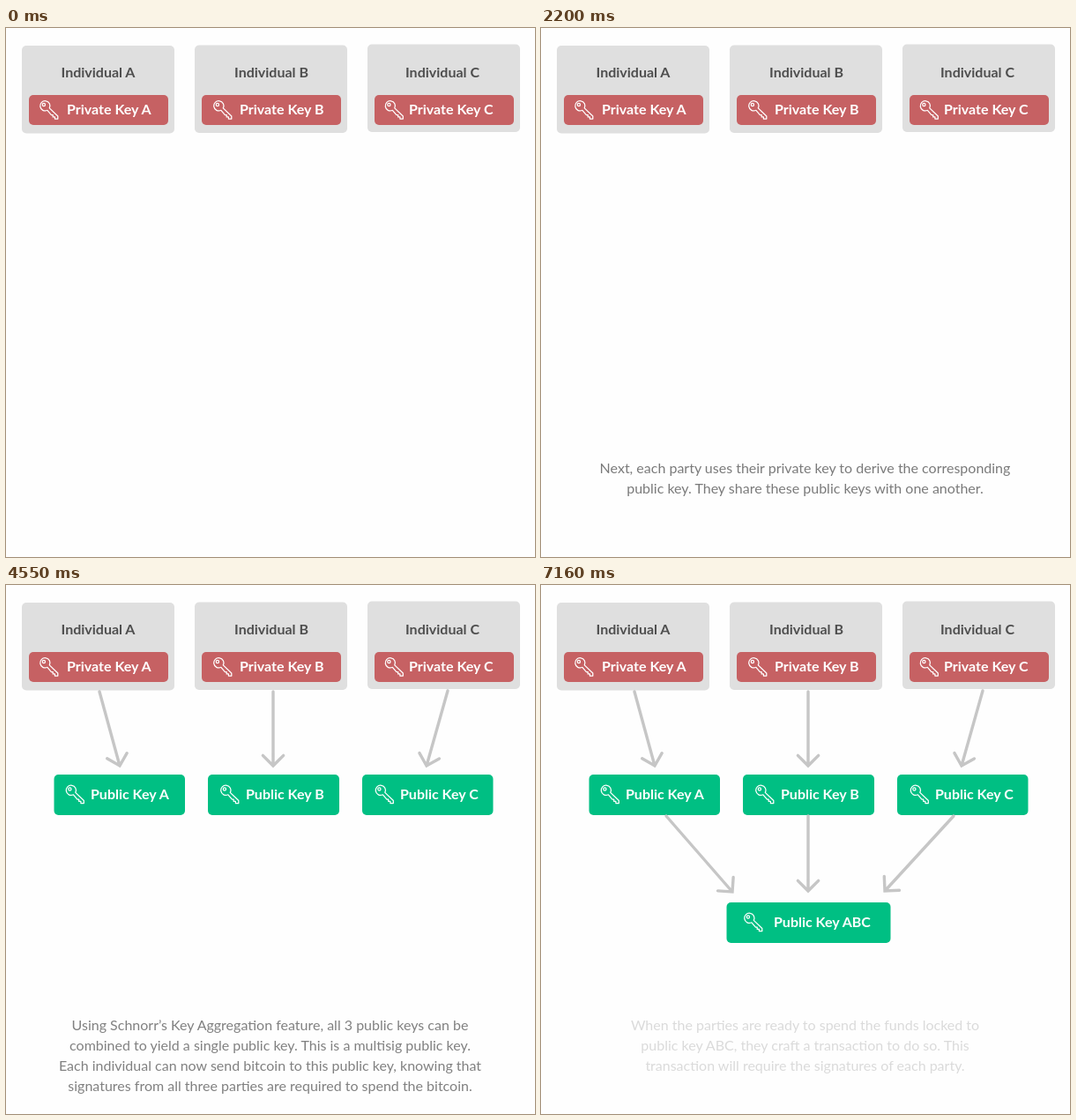
Write an HTML page that moves like this. It is 600 px wide and 600 px high and loops after 7.18 s.

```html
<!DOCTYPE html>
<html lang="en">
<head>
<meta charset="utf-8">
<title>Schnorr Multisig setup</title>
<style>
  html, body { margin: 0; height: 100%; overflow: hidden; background: #fefefe; }
  svg { display: block; width: 100%; height: 100%; }
  text { font: 16px Lato, "Open Sans", sans-serif; }
  .label { font-weight: 700; fill: #fff; }
  .title { font-weight: 700; fill: #4e4e4e; text-anchor: middle; }
  .caption { fill: #545454; text-anchor: middle; }
  .arrow { fill: none; stroke: #c6c6c6; stroke-width: 3.4; stroke-linecap: round; }
  .icon { fill: none; stroke: #fff; stroke-width: 1.25; stroke-linejoin: round; }
</style>
</head>
<body>
<svg id="stage" viewBox="0 0 600 600"></svg>
<script>
const LOOP = 7180;
const GREY = '#dfdfdf', RED = '#c66163', GREEN = '#00bf83';

const box = (x, y, w, h, fill) =>
  `<rect x="${x}" y="${y}" width="${w}" height="${h}" rx="5" fill="${fill}"/>`;

const text = (cls, x, y, str) => `<text class="${cls}" x="${x}" y="${y}">${str}</text>`;

const icon = (x, y) => `<g class="icon" transform="translate(${x} ${y})">
  <path d="M8.9 11.3A5.6 5.6 0 1 1 11.3 8.9L20.8 18V21H17.4V18.9H15.2V16.7H13.4Z"/>
  <circle cx="4.9" cy="4.9" r="1.6"/></g>`;

// Straight arrow whose two head strokes open 45 degrees from the shaft
function arrow(x1, y1, x2, y2) {
  const back = Math.atan2(y1 - y2, x1 - x2);
  const tip = turn => `${x2 + 16.5 * Math.cos(back + turn)} ${y2 + 16.5 * Math.sin(back + turn)}`;
  const a = Math.PI / 4;
  return `<path class="arrow" d="M${x1} ${y1}L${x2} ${y2}M${tip(a)}L${x2} ${y2}L${tip(-a)}"/>`;
}

const card = (name, x, y, titleX, iconX, labelX) =>
  box(x, y, 173, 99.5, GREY) + text('title', titleX, 55.5, 'Individual ' + name) +
  box(x + 8, 76, 158, 34, RED) + icon(iconX, 82) + text('label', labelX, 98, 'Private Key ' + name);

const publicKey = (name, x, y, w, iconX, labelX) =>
  box(x, y, w, 46, GREEN) + icon(iconX, y + 11.5) +
  text('label', labelX, y + 27.5, 'Public Key ' + name);

const caption = lines => lines.map((s, i) => text('caption', 299.5, 505 + 23 * i, s)).join('');

// Each layer: content, fade-in start and end, fade-out start and end
const layers = [
  [caption([
    'Three individuals would like to create a Schnorr Multisig',
    'setup. First, each individual derives a private key, which',
    'they keep secret from the other members.'
  ]), 0, 260, 1850, 2020],
  [caption([
    'Next, each party uses their private key to derive the corresponding',
    'public key. They share these public keys with one another.'
  ]), 2030, 2250, 4070, 4350],
  [caption([
    'Using Schnorr’s Key Aggregation feature, all 3 public keys can be',
    'combined to yield a single public key. This is a multisig public key.',
    'Each individual can now send bitcoin to this public key, knowing that',
    'signatures from all three parties are required to spend the bitcoin.'
  ]), 4370, 4600, 6810, 7090],
  [caption([
    'When the parties are ready to spend the funds locked to',
    'public key ABC, they craft a transaction to do so. This',
    'transaction will require the signatures of each party.'
  ]), 7110, 7350],
  [arrow(106, 121, 129, 205) + arrow(303, 121, 303, 205) + arrow(501, 120, 477, 205) +
    publicKey('A', 54.5, 215, 148.5, 67.5, 96) +
    publicKey('B', 229, 215, 149, 243, 272) +
    publicKey('C', 404, 215, 148.5, 418.5, 447), 2250, 2480],
  [arrow(142, 262, 217, 348) + arrow(303, 262, 303, 347) + arrow(468, 262, 390, 347) +
    publicKey('ABC', 210.5, 360, 186, 230, 264), 4600, 4810]
];

const stage = document.getElementById('stage');
stage.innerHTML =
  card('A', 18, 20, 104.5, 38, 69) +
  card('B', 214, 19.5, 301, 235, 265) +
  card('C', 410, 18.5, 495, 429.5, 457) +
  layers.map(([content]) => `<g class="layer" opacity="0">${content}</g>`).join('');
const groups = stage.querySelectorAll('.layer');

const ramp = (t, from, to) => Math.min(1, Math.max(0, (t - from) / (to - from)));

function draw(now) {
  const t = Math.floor(now % LOOP / 20) * 20;
  layers.forEach(([, inStart, inEnd, outStart, outEnd], i) => {
    const out = outStart ? ramp(t, outStart, outEnd) : 0;
    groups[i].setAttribute('opacity', ramp(t, inStart, inEnd) * (1 - out));
  });
  requestAnimationFrame(() => draw(performance.now() - start));
}

const start = performance.now();
draw(0);
</script>
</body>
</html>
```
